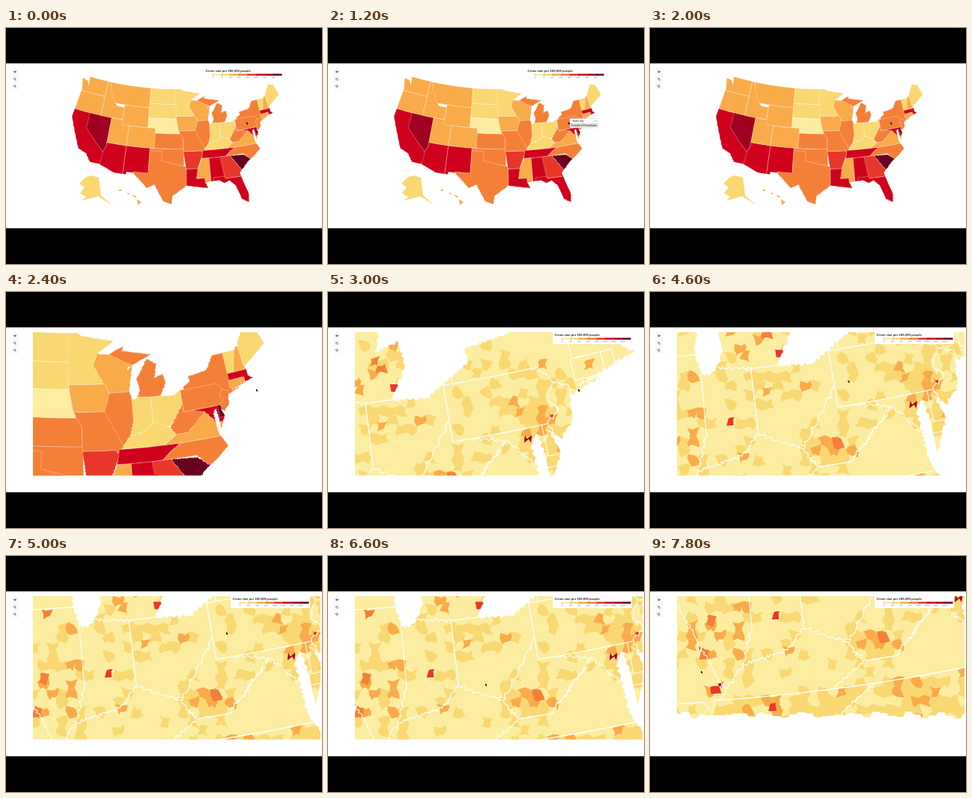
Write an HTML page that moves like this. It is 422 px wide and 317 px high and loops after 8 s.

```html
<!DOCTYPE html>
<html lang="en">
<head>
<meta charset="utf-8">
<title>Crime rate map</title>
<style>
html, body { margin: 0; width: 100%; height: 100%; overflow: hidden; background: #000; }
svg { display: block; width: 100vw; height: 100vh; }
path { vector-effect: non-scaling-stroke; stroke-linejoin: round; }
text { font-family: "Liberation Sans", Arial, sans-serif; fill: #222; }
#shapes path { stroke: #fff8; stroke-width: .5; }
/* Black vanishes under screen blending, so only the white outlines stay. */
#borders { mix-blend-mode: screen; }
#borders path { fill: #000; stroke: #fff; stroke-width: 1.1; }
</style>
</head>
<body>
<svg viewBox="0 0 422 317">
  <defs>
    <clipPath id="frame"><rect x="36" y="54" width="384" height="192.5"/></clipPath>
    <clipPath id="loaded"><path id="loadedArea"/></clipPath>
    <clipPath id="coast"><path id="coastline"/></clipPath>
  </defs>
  <rect y="47.5" width="422" height="221.5" fill="#fff"/>
  <g clip-path="url(#frame)">
    <g id="states">
      <g id="shapes" clip-path="url(#coast)"></g>
      <path fill="#f9d872" d="M107 200L114 198 124 201 127 225 142 238 123 226 101 232 107 227 99 222 105 214 98 209Z"/>
      <path fill="#f9ab4a" d="M151 217h3v2h-3zM161 221l4 1-1 2zM168 224l6 2-2 2zM175 230l6 4-5 4z"/>
    </g>
    <g id="counties"><g clip-path="url(#loaded)">
      <g clip-path="url(#coast)" transform="translate(-1259.5 -550.5) scale(5)">
        <rect width="422" height="317" fill="#fceda0"/>
        <g id="patches" transform="translate(251.9 110.1) scale(.2)"></g>
        <g id="borders"></g>
      </g>
    </g></g>
  </g>
  <g id="legend">
    <rect id="legendBack" x="264" y="54" width="106" height="16" fill="#fff"/>
    <text x="266.5" y="59" font-size="4.25" font-weight="bold">Crime rate per 100,000 people</text>
    <g id="scale"></g>
  </g>
  <g id="buttons" fill="none" stroke="#444" stroke-width=".7"></g>
  <g id="tooltip" font-size="3">
    <rect x="323" y="121.5" width="38" height="12.5" rx=".8" fill="#fafafa" stroke="#bbb" stroke-width=".4"/>
    <rect x="324" y="128" width="36" height="5" fill="#dcdcdc"/>
    <text x="326.5" y="126">States only</text>
    <text x="356.5" y="126">×</text>
    <text x="325" y="131.8">Counties of Pennsylvania</text>
  </g>
  <path id="cursor" d="M0 0V3.6L.9 2.8 1.6 4.2 2.2 3.9 1.6 2.6H2.7Z" fill="#111"/>
</svg>
<script>
const $ = id => document.getElementById(id);
const COLORS = ['#fceda0', '#f9d872', '#f9ab4a', '#f48038', '#e9362a', '#cf021d', '#a00122', '#690120'];

function add(parent, tag, attributes, text = '') {
  const node = document.createElementNS('http://www.w3.org/2000/svg', tag);
  for (const key in attributes) node.setAttribute(key, attributes[key]);
  node.textContent = text;
  return parent.appendChild(node);
}

let seed = 11;
const random = () => (seed = seed * 16807 % 2147483647) / 2147483647;

// Albers equal-area conic, longitudes given in degrees west.
const RAD = Math.PI / 180, N = .602836, C = 1.35122;
function project(west, lat) {
  const rho = 383 * Math.sqrt(C - 2 * N * Math.sin(lat * RAD)) / N;
  const theta = N * (96 - west) * RAD;
  return [229.4 + rho * Math.sin(theta), rho * Math.cos(theta) - 339.9].map(v => v.toFixed(2)).join(' ');
}

// Edges along a parallel or meridian stay smooth; all others meander like rivers and shores.
function trace(points) {
  const v = points.split(' ').map(Number), path = [];
  for (let i = 0; i < v.length; i += 2) {
    const [x0, y0] = [v[i], v[i + 1]];
    const dx = v[(i + 2) % v.length] - x0, dy = v[(i + 3) % v.length] - y0;
    const straight = !dx || !dy;
    const steps = Math.ceil(Math.hypot(dx, dy) / (straight ? 1.5 : .14));
    for (let s = 0; s < steps; s++) {
      const x = x0 + dx * s / steps, y = y0 + dy * s / steps;
      const bend = s && !straight ? .07 : 0;
      path.push(project(x + bend * Math.sin(23 * y + 11 * x), y + bend * Math.sin(19 * x - 7 * y)));
    }
  }
  return 'M' + path.join('L') + 'Z';
}

const NORTH = '124.7 48.4 123 48.1 122.4 47.3 122.7 49 95.1 49 94.6 48.7 89.6 48 92.1 46.7 90.4 46.6 88 47.4 88.4 46.9 84 46.2 87.6 45.1 88 44.6 87 45.3 87.8 42.5 87.3 41.6 86.7 41.8 86.2 42.6 86.5 43.8 84.7 45.8 83.4 45.1 83.9 43.7 82.6 44 82.4 43 83.4 41.7 81.5 41.6 78.9 42.8 79 43.3 76.2 43.6 75 45 71.5 45 69.2 47.4 67.8 47 67 44.8';
const ATLANTIC = '70.6 43.1 70.6 42 70 41.7 73.7 40.9 72 41.1 74 40.6 74.1 39.7 74.9 39 75.5 39.5 75.1 38.5 75.9 37.2 75.9 38.5 76.1 39.5 76.5 39 76.4 37 75.5 35.3 79.3 33.1 81.4 31.3 80.1 26.9 80.4 25.2 81.8 26.1 82.7 28.9 84 30.1 85.3 29.7';
const SOUTHWEST = '86.3 30.4 89.6 30.2 89.1 29 94 29.7 97.2 27.6 97.4 25.9 99.2 26.5 101.4 29.8 103.1 29 106.5 31.8 108.2 31.8 108.2 31.3 111 31.3 114.8 32.5 117.1 32.5 118.5 34 120.6 34.6 124.4 40.4 124 46.2';
$('coastline').setAttribute('d', trace([NORTH, ATLANTIC, SOUTHWEST].join(' ')));

// States overlap: later ones cover earlier ones and the coast trims them all.
function state(level, points) {
  const d = trace(points);
  add($('shapes'), 'path', { d, fill: COLORS[level] });
  add($('borders'), 'path', { d });
}
const box = (level, w, e, s, n) => state(level, `${w} ${n} ${e} ${n} ${e} ${s} ${w} ${s}`);

box(2, 126, 117, 45.9, 50);      // Washington
box(2, 126, 117, 42, 45.9);      // Oregon
box(5, 126, 114, 32, 42);        // California
state(6, '120 42 114 42 114 36.2 114.6 35 120 39'); // Nevada
state(5, '114 37 109 37 109 31 115 31 114.5 34.5 114.6 35 114 36.2'); // Arizona
box(2, 116, 104, 45, 49);        // Montana
state(2, '117 49 116 49 116 48 114.4 45.5 113 44.5 111 44.5 111 42 117 42'); // Idaho
box(2, 114, 109, 37, 42);        // Utah
box(2, 111, 104, 41, 45);        // Wyoming
box(5, 109, 103, 31, 37);        // New Mexico
box(3, 90.5, 82, 41.73, 48);     // Michigan
state(1, '97.2 49.5 89 49.5 89 47.7 92.2 46.6 92.8 45.5 91.2 43.5 96.5 43.5'); // Minnesota
box(1, 104, 96.7, 45.9, 49);     // North Dakota
box(1, 104, 96.5, 43, 45.9);     // South Dakota
box(0, 104, 95.3, 40, 43);       // Nebraska
box(2, 109, 102, 37, 41);        // Colorado
box(3, 102, 94.6, 37, 40);       // Kansas
box(3, 103, 94.5, 33.6, 37);     // Oklahoma
box(3, 102, 94.6, 37, 40);       // Kansas again, above Oklahoma
state(3, '103 36.5 100 36.5 100 34.6 94 33.5 94 29 96 25 108 25 106.6 32 103 32'); // Texas
state(2, '92.1 46.8 92.8 45.5 90.6 42.5 86.8 42.5 86.8 45.2 90.4 46.6'); // Wisconsin
state(2, '96.5 43.5 91.2 43.5 90.2 41.8 91.4 40.6 95.8 40.6'); // Iowa
state(3, '95.8 40.6 91 40.6 89 37 89.3 36 90.4 36 90.2 36.5 94.6 36.5 94.6 39.1'); // Missouri
state(4, '94.6 36.5 90.2 36.5 89.7 36 91.2 33 94 33'); // Arkansas
box(5, 94, 89, 28.5, 33);        // Louisiana
state(2, '91.2 33 90.1 35 88.2 35 88.4 30 89.6 30 89.7 31 91.6 31'); // Mississippi
box(5, 88.3, 85, 30, 35);        // Alabama
state(3, '91.4 40.6 90.6 42.5 87 42.5 87.5 39.3 88.1 37.9 89.1 36.9'); // Illinois
state(1, '87.5 42 87.5 39.3 88.1 37.9 85.8 38.3 84.8 39.1 84.8 41.73'); // Indiana
state(1, '84.8 41.73 83 41.73 80.5 42.5 80.5 40.6 82.5 38.4 83.7 38.6 84.8 39.1'); // Ohio
state(1, '89.1 36.9 88.1 37.9 85.8 38.3 84.8 39.1 82.6 38.3 82 37.5 83.7 36.55 89.5 36.55'); // Kentucky
state(3, '84.3 35 81.7 36.55 75 36.55 75 33 78.5 33.8 79.7 35'); // North Carolina
state(5, '89.7 36.55 81.7 36.55 84.3 35 90.1 35'); // Tennessee
state(4, '85.6 35 83.1 35 80.9 32 81 30.6 85 30.6'); // Georgia
state(7, '83.1 35 79.7 34.8 78 33.5 80 31.5 80.9 32'); // South Carolina
state(5, '87.6 31 85 31 84.9 30.6 80 30.6 79 25 85 25 87.6 30'); // Florida
box(5, 79.5, 75, 37.9, 39.72);   // Maryland
state(2, '83.7 36.55 75 36.55 75 38 76.3 38 77.7 39.4 80.3 37.5 82 37.5'); // Virginia
state(3, '80.5 40.6 80.5 39.72 79.5 39.72 77.8 39.4 80.3 37.5 82 37.5 82.6 38.3'); // West Virginia
box(7, 75.75, 75, 38.45, 39.8);  // Delaware
box(3, 80, 71.8, 40.5, 45);      // New York
state(3, '80.5 39.72 80.5 42 75.3 42 74.7 41.3 74.7 39.72'); // Pennsylvania
state(3, '75.4 39.8 74.7 40.2 75.2 40.7 74.7 41.3 73.9 41 73.5 39 75 38.8'); // New Jersey
box(1, 73.4, 71.5, 42.73, 45);   // Vermont
state(2, '71.5 45.3 71 45.3 70.7 42.73 72.5 42.73'); // New Hampshire
state(1, '71 45.3 70 47.5 66 47.5 66 43 70.8 43'); // Maine
box(5, 73.4, 69.5, 41.5, 42.73); // Massachusetts
box(2, 73.5, 71.8, 41.15, 42.03); // Connecticut
box(2, 71.8, 71.2, 41.15, 42.03); // Rhode Island

let edge = 'M-20 -60V296';
for (let x = -20; x < 560; x += 11) edge += `L${x} ${(292 + 10 * (random() - .5)).toFixed(1)}h8`;
$('loadedArea').setAttribute('d', edge + 'V-60Z');

// Regions with raised rates: x, y, radius, strength.
const REGIONS = [[55, 170, 70, .5], [268, 190, 36, 1], [405, 130, 50, .7], [200, 50, 60, .3], [350, 70, 65, .35], [170, 138, 45, .3]];
function density(x, y) {
  const south = y > 268 - .115 * (x - 99);
  return REGIONS.reduce((sum, [cx, cy, r, strength]) =>
    sum + strength * Math.exp(-((x - cx) ** 2 + (y - cy) ** 2) / r ** 2), south ? .7 : .03);
}

// Counties share the corners of a bent grid.
const corner = (x, y) => [x + 2.5 * Math.sin(x * 1.7 + y * 2.3), y + 2.5 * Math.sin(y * 1.9 - x * 1.3)]
  .map(v => v.toFixed(1)).join(' ');
function county(level, x, y, size) {
  const h = size / 2;
  const d = [[-h, -h], [0, -h], [h, -h], [h, 0], [h, h], [0, h], [-h, h], [-h, 0]]
    .map(([dx, dy]) => corner(x + dx, y + dy));
  add($('patches'), 'path', { d: 'M' + d.join('L') + 'Z', fill: COLORS[level] });
}
const CELL = 12.5;
for (let x = 0; x < 540; x += CELL)
  for (let y = -15; y < 300; y += CELL) {
    const chance = density(x, y), roll = random();
    if (roll < chance) county(roll < chance * .17 ? 2 : 1, x, y, CELL);
  }

// The cities that stand out: level, size, then positions.
[[2, 12, [85, 147], [96, 147], [157, 70], [185, 117], [154, 205], [250, 197], [370, 98], [380, 127]],
 [3, 12, [54, 77], [50, 165], [43, 209], [281, 187], [176, 31], [186, 41]],
 [4, 10, [138, 156], [201, 64], [57, 256], [134, 279]],
 [4, 6, [413, 104]],
 [6, 5, [381, 135], [36, 203], [64, 251]],
].forEach(([level, size, ...places]) => places.forEach(([x, y]) => county(level, x, y, size)));

const ticks = COLORS.map((fill, i) => {
  const x = 276.5 + i * 11.5;
  add($('scale'), 'rect', { x, y: 61.5, width: 11.5, height: 2.5, fill });
  add($('scale'), 'rect', { x, y: 61.5, width: .25, height: 3.3, fill: '#333' });
  return add($('scale'), 'text', { x, y: 67.2, 'font-size': 2.4, 'text-anchor': 'middle' });
});

const LENS = 'M12.4 60l1.2 1.2M10.4 59a1.3 1.3 0 1 0 2.6 0a1.3 1.3 0 1 0-2.6 0';
['M10 59l2-1.6 2 1.6zM11 59.5h2', LENS, LENS].forEach((d, i) => {
  const button = add($('buttons'), 'g', { transform: `translate(0 ${i * 9.5})` });
  add(button, 'rect', { x: 8, y: 55, width: 8, height: 7.5, rx: 1, stroke: '#ddd', 'stroke-width': .4 });
  add(button, 'path', { d });
});

// Keyframes: time, then values.
const VIEW = [[0, 1, 0, 0], [2000, 1, 0, 0], [2400, 1.9, -348, -101], [3000, 5, -1373.5, -488], [4200, 5, -1373.5, -488],
  [4800, 5, -1259.5, -550.5], [6800, 5, -1259.5, -550.5], [7300, 5, -1228.5, -628.5], [8000, 5, -1228.5, -628.5]];
const POINTER = [[0, 321, 126], [2000, 321, 126], [2400, 334, 130], [3000, 334, 130], [3600, 282, 130], [3800, 282, 130],
  [4200, 180, 164.5], [4800, 294, 102], [5000, 294, 102], [5800, 210, 171], [6800, 210, 171], [7300, 241, 93], [7800, 68, 154], [8000, 68, 154]];

function at(keys, time) {
  const i = keys.findIndex(key => key[0] > time);
  const [t0, ...from] = keys[i - 1], [t1, ...to] = keys[i];
  const u = (time - t0) / (t1 - t0), eased = u * u * (3 - 2 * u);
  return from.map((value, j) => value + (to[j] - value) * eased);
}
const show = (id, visible) => $(id).setAttribute('display', visible ? 'inline' : 'none');

function draw(now) {
  const time = Math.floor(now % 8000 / 200) * 200;
  const [zoom, x, y] = at(VIEW, time), detailed = time >= 3000;
  $('states').setAttribute('transform', `translate(${x} ${y}) scale(${zoom})`);
  $('counties').setAttribute('transform', `translate(${x + 1259.5} ${y + 550.5})`);
  $('legend').setAttribute('transform', `translate(${detailed ? 36 : 0} 0)`);
  $('cursor').setAttribute('transform', `translate(${at(POINTER, time)})`);
  ticks.forEach((tick, i) => tick.textContent = (i * (detailed ? 300 : 70)).toLocaleString('en-US'));
  show('states', !detailed);
  show('counties', detailed);
  show('legend', time < 2000 || detailed);
  show('legendBack', detailed);
  show('tooltip', time >= 800 && time < 2000);
  requestAnimationFrame(draw);
}
requestAnimationFrame(draw);
</script>
</body>
</html>
```
